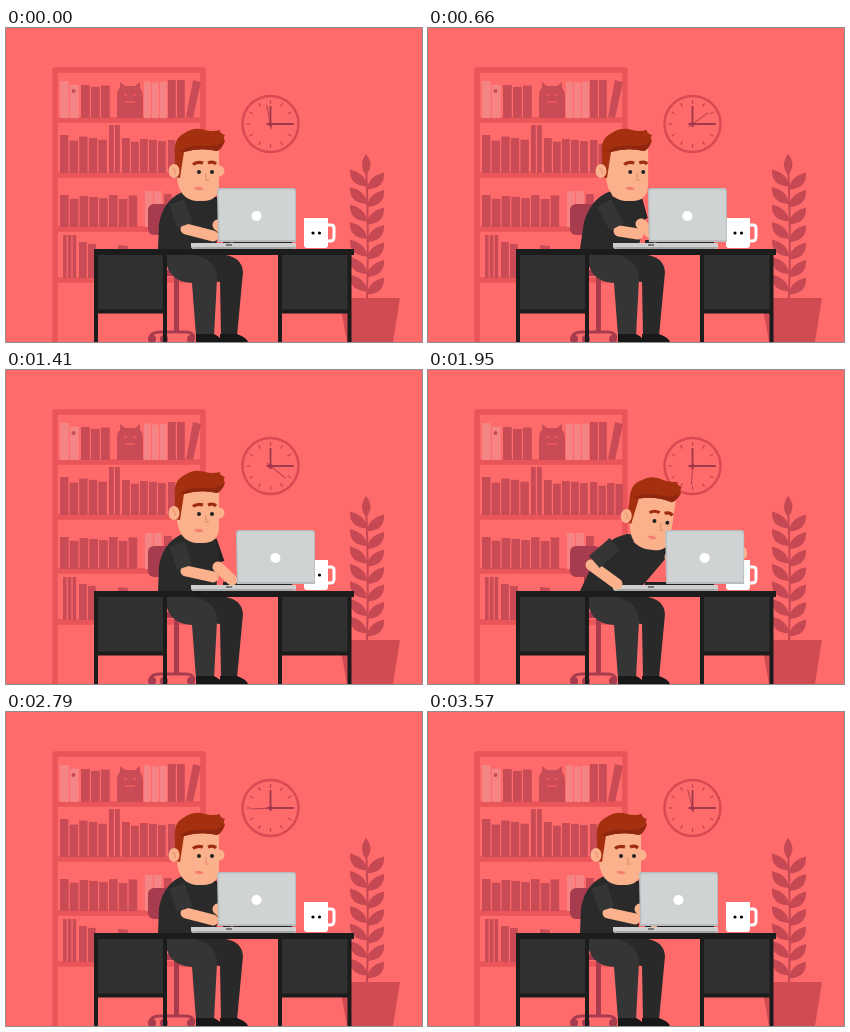
An HTML page for the animation above (3600 ms loop, 416 by 314 pixels).

```html
<!DOCTYPE html>
<html lang="en">
<head>
<meta charset="utf-8">
<title>Typing</title>
<style>
  html, body { margin: 0; width: 100%; height: 100%; overflow: hidden; background: #ff6b6b; }
  svg { display: block; width: 416px; height: 314px; }
  .arm { fill: none; stroke-linecap: round; stroke-linejoin: round; }
  .sleeve { stroke: #353535; stroke-width: 16; stroke-linecap: butt; }
  .far { stroke: #222; }
  .skin { stroke: #fbb28c; stroke-width: 11; }
</style>
</head>
<body>
<svg viewBox="0 0 416 314">
  <g id="shelf">
    <path d="M49 314V42H197V314M49 92H197M49 147H197M49 201H197M49 252H197" fill="none" stroke="#e95558" stroke-width="5.5" stroke-linejoin="round"/>
    <g id="books"></g>
    <g fill="#c94b55">
      <path d="M111 90V68Q111 62 114 60V54L119 58H129L134 54V60Q137 63 137 69V90Z"/>
      <path d="M180 89L187 52 195 54 187 90ZM112 217l10 1v4h-10z"/>
      <circle cx="67.5" cy="63" r="2"/>
    </g>
    <path d="M118 67h3m6 0h3M119 74h10" stroke="#e95558" stroke-width="2"/>
  </g>

  <g id="clock" transform="translate(264.5 96)" stroke="#b4404c" fill="none">
    <circle r="28" stroke="#d94a52" stroke-width="2.5"/>
    <g id="ticks" stroke="#c9474f" stroke-width="1.3"></g>
    <path d="M0 3V-18M-4 0H23" stroke="#a0374a" stroke-width="1.8"/>
    <path id="second" d="M0 5V-19"/>
    <circle r="2" fill="#a0374a" stroke="none"/>
  </g>

  <g id="plant" fill="#c54853">
    <path d="M361 272Q363 200 360 135" fill="none" stroke="#c54853" stroke-width="2"/>
    <path d="M360 126Q369 137 360 147 352 137 360 126Z"/>
    <path d="M333 270H394L387 314H341Z" fill="#d14b53"/>
  </g>

  <g id="chair" fill="#a63c4d">
    <rect x="142" y="176" width="31" height="31" rx="6"/>
    <path d="M156 205h5v40h-5zM153 242h38v6h-38zM168 246h5v58h-5z"/>
    <path d="M144 310Q145 304 154 304H180Q187 304 188 310" fill="none" stroke="#a63c4d" stroke-width="3"/>
    <circle cx="146" cy="311" r="4"/><circle cx="158" cy="311" r="4"/><circle cx="185" cy="311" r="4"/>
  </g>

  <g id="legs">
    <path d="M160 226H214Q236 228 237 244L231 308H215L214 254 180 250Z" fill="#292929"/>
    <path d="M159 226H185Q211 231 211 251L208 308H190L186 255Q160 254 159 226Z" fill="#353535"/>
    <path d="M190 314V306H208Q215 309 216 314ZM214 314V306H231Q240 309 242 314Z" fill="#181818"/>
  </g>

  <path id="farSleeve" class="arm sleeve far"/>
  <path id="torso" fill="#2a2a2a"/>

  <g id="desk">
    <path d="M91 226H159V284H91ZM274 226H344V284H274Z" fill="#303030"/>
    <path d="M88 221H348V227H88Z" fill="#1c1c1c"/>
    <path d="M90 224V314M159 224V314M274 224V314M343.5 224V314M90 283.5H159M274 283.5H343" stroke="#1c1c1c" stroke-width="4"/>
  </g>

  <g id="mug">
    <path d="M320 197H325Q328 197 328 200V209Q328 213 324 213H320" fill="none" stroke="#fff" stroke-width="3"/>
    <path d="M298 190H322V217Q322 220 319 220H301Q298 220 298 217Z" fill="#fff"/>
    <circle cx="307" cy="205" r="1.6"/><circle cx="313.5" cy="205" r="1.6"/>
  </g>

  <g id="base">
    <path d="M217 212H286V216H217Z" fill="#222"/>
    <path d="M185 215H290V219Q290 221 287 221H188Q185 221 185 218Z" fill="#cfcfcf"/>
    <path d="M186 219H290L287 221H189Z" fill="#a6a6a6"/>
    <path d="M220 216h6v2h-6z" fill="#777"/>
  </g>

  <path id="farHand" class="arm skin"/>
  <path id="nearHand" class="arm skin"/>
  <path id="nearSleeve" class="arm sleeve"/>

  <g id="head">
    <path d="M178 156H205V167Q194 177 179 168Z" fill="#ee9b78"/>
    <circle id="farEar" cy="143" r="5.5" fill="#fbb28c"/>
    <g id="face">
      <path d="M171 118H213V158Q212 173 197 173H190Q173 171 171 150Z" fill="#fbb28c"/>
      <g id="features">
        <path d="M187 136.5Q191 133 197 135M202 135Q207 133 210 136" fill="none" stroke="#9e2c13" stroke-width="3.2"/>
        <circle cx="193" cy="144" r="2" fill="#222"/><circle cx="206" cy="144" r="2" fill="#222"/>
        <path d="M200 145V152H203" fill="none" stroke="#ee9b78" stroke-width="2"/>
        <path d="M188 160Q193 157 198 161 192 164 188 160Z" fill="#f27f70"/>
      </g>
    </g>
    <path d="M169 149V128Q167 111 177 106 188 98 199 102 206 104 214 102 213 105 219 107 217 109 219 113 216 121 211 123 194 119 178 124L176 137 174 150Z" fill="#a5300f"/>
    <path d="M173 124Q182 116 202 118 213 118 218 113 216 121 211 123 194 119 178 124Z" fill="#8f260f"/>
    <ellipse cx="168" cy="143" rx="5.5" ry="7" fill="#fbb28c"/>
    <path d="M166 140q4 1 3 6" fill="none" stroke="#ee9b78" stroke-width="1.5"/>
  </g>

  <ellipse id="grip" cy="183" rx="4" ry="6" fill="#fbb28c"/>
  <g id="lid">
    <path d="M214 160H287Q290 160 290 163V214H212L211 163Q211 160 214 160Z" fill="#b9bdbf"/>
    <path d="M215 161.5H286Q289 161.5 289 164V212H213.5L212.5 164Q212.5 161.5 215 161.5Z" fill="#d0d3d4"/>
    <circle cx="250.5" cy="188" r="5" fill="#fff"/>
  </g>
</svg>
<script>
const $ = id => document.getElementById(id);
const LOOP = 3600;

// A run of books: count, left edge, bottom, spacing, typical height; heights vary by a small rule.
function books(count, left, bottom, pitch, height, vary = 0, fill = '#c94b55') {
  for (let i = 0; i < count; i++) {
    const h = height + vary * Math.cos(i * 2.6);
    $('books').innerHTML += `<rect x="${left + i * pitch}" y="${bottom - h}" width="${pitch - 1.2}" height="${h}" fill="${fill}"/>`;
  }
}
const pale = '#f58584';
books(2, 54, 90, 10, 35, 2, pale);
books(3, 75, 90, 10, 32, 1);
books(3, 138, 90, 8, 36, .5, pale);
books(2, 162, 90, 9, 38);
books(5, 54, 145, 9.6, 35, 3);
books(2, 103, 145, 6, 48);
books(5, 116, 145, 9, 33, 2);
books(4, 162, 145, 8.5, 31, 2);
books(8, 54, 199, 9.8, 30, 2);
books(2, 139, 199, 9, 36, 0, pale);
books(1, 158, 199, 9, 33);
books(3, 57, 250, 4.8, 43);
books(2, 73, 250, 9, 35, 1);

for (let i = 0; i < 12; i++)
  $('ticks').innerHTML += `<path d="M0-24V-20" transform="rotate(${i * 30})"/>`;

for (let i = 0; i < 7; i++)
  for (const side of [-1, 1])
    $('plant').innerHTML += `<path d="M0 0Q1-13 17-17 18-1 0 0Z" transform="translate(361 ${160 + i * 17.5 + side * 1.5}) scale(${side} 1)"/>`;

// Head x, y, turn, face shift; back, neck, chest; near shoulder, elbow, hand; far elbow.
const rest = [0, 0, 0, 0, 153, 196, 203, 165, 213, 190, 171, 174, 180, 201, 207, 208, 212, 197];
const look = [5, 0, 0, 3.5, 156, 194, 206, 165, 217, 192, 176, 175, 191, 203, 210, 207, 213, 196];
const reach = [27, 6, 8, 3, 163, 198, 222, 166, 238, 188, 187, 174, 163, 195, 189, 214, 242, 187];
const keys = [[0, rest], [70, rest], [300, look], [1050, look], [1300, rest], [1640, rest],
  [1890, reach], [1990, reach], [2290, rest], [LOOP, rest]];

const ramp = (t, a, b) => {
  const k = Math.min(1, Math.max(0, (t - a) / (b - a)));
  return k * k * (3 - 2 * k);
};

function poseAt(t) {
  const i = keys.findIndex(k => k[0] > t);
  const [t0, from] = keys[i - 1], [t1, to] = keys[i];
  const k = ramp(t, t0, t1);
  return from.map((v, j) => v + (to[j] - v) * k);
}

function drawArm(name, sx, sy, ex, ey, hx, hy) {
  $(name + 'Sleeve').setAttribute('d', `M${sx} ${sy}L${sx + (ex - sx) * .86} ${sy + (ey - sy) * .86}`);
  $(name + 'Hand').setAttribute('d', `M${ex} ${ey}L${hx} ${hy}`);
}

function draw(t) {
  const [hx, hy, turn, shift, bx, by, nx, ny, cx, cy, sx, sy, ex, ey, handX, handY, fx, fy] = poseAt(t);
  const typing = 1 - ramp(t, 1640, 1800) + ramp(t, 2200, 2300);
  const bob = Math.sin(t * Math.PI / 90) * 1.2 * typing;

  $('torso').setAttribute('d', `M152 221L${bx} ${by}Q${sx - 13} ${sy - 5} ${nx - 23} ${ny - 2}
    L${nx} ${ny}Q${nx + 10} ${ny + 3} ${cx} ${cy}L210 221Z`);
  drawArm('near', sx, sy, ex, ey, handX, handY + bob);
  drawArm('far', nx, ny + 6, fx, fy, fx + 14, fy + 12 - bob);

  const face = `translate(${shift * .6} 0)`;
  $('head').setAttribute('transform', `translate(${hx} ${hy}) rotate(${turn} 191 165)`);
  $('face').setAttribute('transform', face);
  $('features').setAttribute('transform', face);
  $('farEar').setAttribute('cx', 213 - shift * 2);

  const slide = t < 1980 ? t * .0134 : 26.5 * (1 - ramp(t, 1980, 2170));
  $('lid').setAttribute('transform', `translate(${slide} 0)`);
  const grip = ramp(t, 1800, 1900) - ramp(t, 2110, 2170);
  $('grip').setAttribute('cx', 274 + slide + 15 * grip);

  $('second').setAttribute('transform', `rotate(${t / 10 - 12})`);
}

function frame() {
  draw(performance.now() % LOOP);
  requestAnimationFrame(frame);
}
frame();
</script>
</body>
</html>
```
